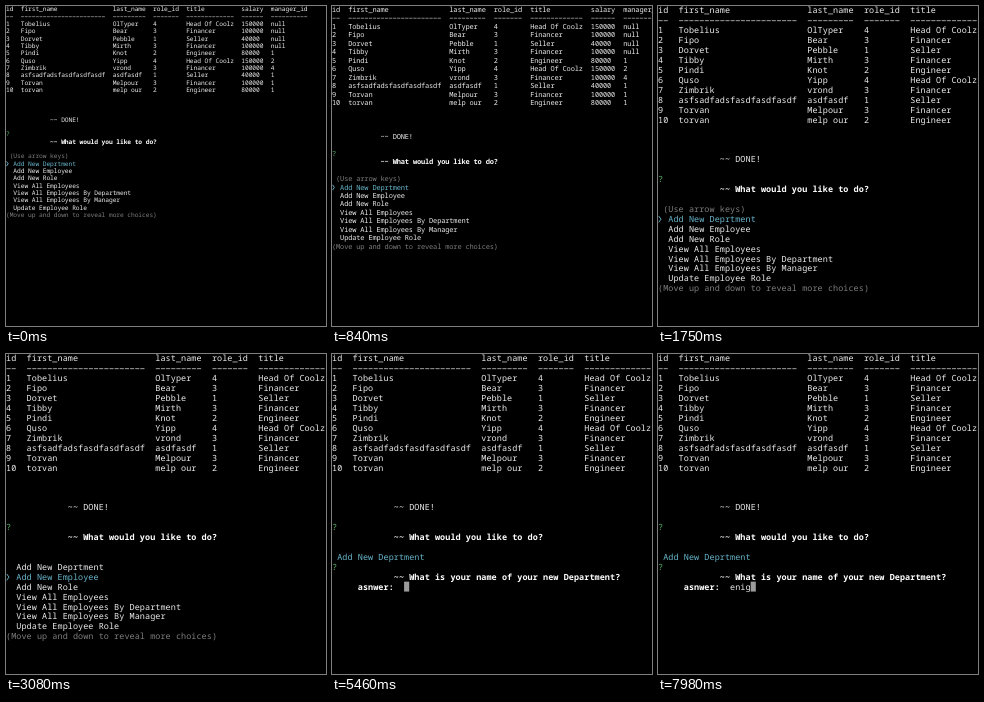
An HTML page for the animation above (8000 ms loop, 320 by 320 pixels).

```html
<!DOCTYPE html>
<html lang="en">
<head>
<meta charset="utf-8">
<title>Terminal session</title>
<style>
  html, body { margin: 0; width: 100%; height: 100%; overflow: hidden; background: #000; }
  svg { display: block; width: 100vw; height: 100vh; }
  text {
    font-family: "Noto Sans Mono", "DejaVu Sans Mono", monospace;
    text-rendering: geometricPrecision;
    white-space: pre;
  }
  .plain { fill: #ececec; }
  .bold { fill: #fff; font-weight: 700; }
  .dim { fill: #7d7d7d; }
  .cyan { fill: #68b6cb; }
  .green { fill: #55b26b; }
  .cursor { fill: #9b9b9b; }
  .rule { stroke: #dcdcdc; }
  .pointer { fill: none; stroke: #68b6cb; stroke-width: 2.6; }
</style>
</head>
<body>
<svg viewBox="0 0 320 320"><g id="screen" transform="translate(0 -0.7) scale(0.3677)"></g></svg>
<script>
const DURATION = 8000;
const ASCENT = 0.9526;
const screen = document.getElementById('screen');

// [start, font size, cell width, row height]
const ZOOM = [
  [0, 17, 10, 20],
  [210, 18, 11, 22],
  [840, 19, 11, 23],
  [1050, 20, 12, 24],
  [1190, 21, 12, 25],
  [1470, 22, 13, 26],
  [1750, 23, 14, 27]
];

// [start, first choice shown, pointer line, hint shown]
const MENU = [
  [0, 0, 0, true],
  [3080, 0, 1, false],
  [3360, 0, 2, false],
  [4270, -1, 2, false],
  [4970, -2, 2, false]
];
const ANSWERED = 5460;

const TYPING = [[0, ''], [7700, 'e'], [7770, 'en'], [7910, 'eni'], [7980, 'enig']];

const CHOICES = [
  'Add New Deprtment', 'Add New Employee', 'Add New Role',
  'View All Employees', 'View All Employees By Department',
  'View All Employees By Manager', 'Update Employee Role',
  'Remove Employees', 'Remove Roles'
];

const WIDTHS = [2, 23, 9, 7, 13, 6, 10];
const HEAD = ['id', 'first_name', 'last_name', 'role_id', 'title', 'salary', 'manager_id'];
const ROLES = {
  1: ['Seller', '40000'],
  2: ['Engineer', '80000'],
  3: ['Financer', '100000'],
  4: ['Head Of Coolz', '150000']
};
const STAFF = [
  ['Tobelius', 'OlTyper', 4, 'null'],
  ['Fipo', 'Bear', 3, 'null'],
  ['Dorvet', 'Pebble', 1, 'null'],
  ['Tibby', 'Mirth', 3, 'null'],
  ['Pindi', 'Knot', 2, '1'],
  ['Quso', 'Yipp', 4, '2'],
  ['Zimbrik', 'vrond', 3, '4'],
  ['asfsadfadsfasdfasdfasdf', 'asdfasdf', 1, '1'],
  ['Torvan', 'Melpour', 3, '1'],
  ['torvan', 'melp our', 2, '1']
];

const at = (steps, t) => steps.filter(s => s[0] <= t).pop();

let size, cell, line;
const baseline = row => row * line + size * ASCENT;

function add(tag, attrs, content) {
  const el = document.createElementNS('http://www.w3.org/2000/svg', tag);
  for (const k in attrs) el.setAttribute(k, attrs[k]);
  if (content) el.textContent = content;
  screen.append(el);
}

// Places every character in its own terminal cell.
function put(row, col, str, cls = 'plain') {
  const x = [...str].map((_, i) => (col + i) * cell).join(' ');
  add('text', { x, y: baseline(row), 'font-size': size, class: cls }, str);
}

function rule(row, col, count) {
  const gap = cell * 0.2;
  const y = baseline(row) - size * 0.31;
  add('line', {
    x1: col * cell + gap / 2, x2: (col + count) * cell - gap / 2, y1: y, y2: y,
    'stroke-width': size * 0.085, 'stroke-dasharray': `${cell - gap} ${gap}`, class: 'rule'
  });
}

function table() {
  const rows = STAFF.map(([first, last, role, boss], i) =>
    [String(i + 1), first, last, String(role), ...ROLES[role], boss]);
  let col = 0;
  WIDTHS.forEach((w, c) => {
    put(0, col, HEAD[c]);
    rule(1, col, w);
    rows.forEach((r, i) => put(i + 2, col, r[c]));
    col += w + 2;
  });
}

function menu([, first, picked, hint]) {
  if (hint) put(20, 1, '(Use arrow keys)', 'dim');
  for (let i = 0; i < 7; i++) {
    const n = (first + i + CHOICES.length) % CHOICES.length;
    put(21 + i, 2, CHOICES[n], i === picked ? 'cyan' : 'plain');
  }
  const y = baseline(21 + picked), x = cell * 0.14;
  add('path', {
    d: `M${x} ${y - size * 0.68}L${cell * 0.58} ${y - size * 0.31}L${x} ${y + size * 0.06}`,
    class: 'pointer'
  });
  put(28, 0, '(Move up and down to reveal more choices)', 'dim');
}

function answer(typed) {
  put(20, 1, CHOICES[0], 'cyan');
  put(21, 0, '?', 'green');
  put(22, 12, '~~ What is your name of your new Department?', 'bold');
  put(23, 5, 'asnwer:', 'bold');
  if (typed) put(23, 14, typed);
  add('rect', {
    x: (14 + typed.length) * cell, y: 23 * line, width: cell, height: line, class: 'cursor'
  });
}

function draw(t) {
  [, size, cell, line] = at(ZOOM, t);
  screen.replaceChildren();
  table();
  put(15, 12, '~~ DONE!');
  put(17, 0, '?', 'green');
  put(18, 12, '~~ What would you like to do?', 'bold');
  if (t < ANSWERED) menu(at(MENU, t));
  else answer(at(TYPING, t)[1]);
}

const CUTS = [...ZOOM, ...MENU, [ANSWERED], ...TYPING].map(s => [s[0]]).sort((a, b) => a[0] - b[0]);
let shown = -1;
function tick() {
  const cut = at(CUTS, performance.now() % DURATION)[0];
  if (cut !== shown) draw(shown = cut);
  requestAnimationFrame(tick);
}
tick();
</script>
</body>
</html>
```
